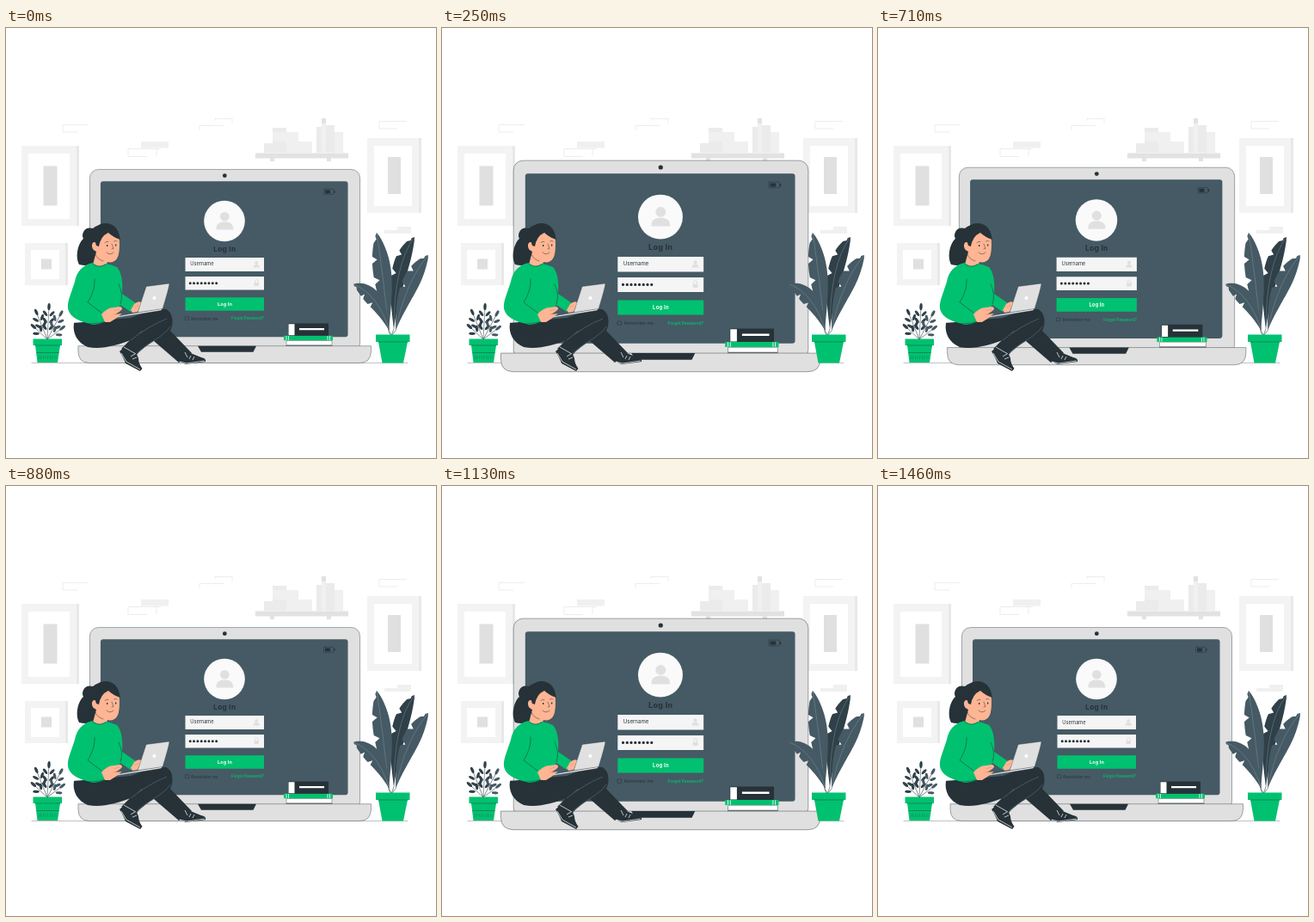
These frames come from a looping animation (500 by 500 pixels, 1500 ms). An HTML page:

```html
<!DOCTYPE html>
<html lang="en">
<head>
<meta charset="utf-8">
<title>Log in</title>
<style>
  html, body { margin: 0; width: 100%; height: 100%; overflow: hidden; background: #fff; }
  svg { display: block; width: 100%; height: 100%; font-family: Inter, sans-serif; }
  .ink { fill: #263238; }
  .slate { fill: #455a64; }
  .dusk { fill: #2f4049; }
  .green { fill: #00c170; }
  .skin { fill: #ffb594; }
  .pale { fill: #f5f5f5; }
  .grey { fill: #e0e0e0; }
  .white { fill: #fff; }
  .line { fill: none; stroke: #263238; stroke-width: .5; stroke-linecap: round; stroke-linejoin: round; }
  .edge { stroke: #263238; stroke-width: .4; stroke-linejoin: round; }
  .light { fill: none; stroke: #e6e6e6; stroke-width: .7; }
  .bold { font-weight: 700; letter-spacing: .04em; }
</style>
</head>
<body>
<svg viewBox="0 0 500 500">
  <!-- wall -->
  <path class="light" d="M96 112.500H66V121h17M164 149.500H142v-9h38M175 140v9M225 119v-5.500h28M243 108v-2.500h20v5M466 108.500H434V117h21"/>
  <path fill="#f0f0f0" d="M157 132h32v7.500h-32zM455 231h16v8h-16zM440 235h17v4h-17z"/>
  <g id="frames"></g>

  <!-- shelf -->
  <path fill="#ebebeb" d="M310 116h16v5h14v14h-30zM300 134h28v11h-28zM361 115h6v30h-6zM372 113h10v32h-10z"/>
  <path fill="#f0f0f0" d="M310 121h30v11h-30zM326 132h30v13h-30zM367 110h5v35h-5zM382 121h10v24h-10z"/>
  <path fill="#e2e2e2" d="M290 145.500h108v6H290zM307 151h5v4h-5zM373 151h5v4h-5zM367 105h5v6h-5z"/>

  <path class="line" style="stroke-width:.3" d="M30 389.500H467"/>

  <!-- computer -->
  <g id="device">
    <rect class="grey edge" x="97.500" y="164.500" width="314" height="212" rx="10"/>
    <rect class="slate" x="110" y="178.300" width="287.500" height="181" rx="3"/>
    <circle class="ink" cx="254.300" cy="171.700" r="2.400"/>
    <path class="grey edge" d="M84 369.700H424.500V376Q424 389.500 411 389.500H97Q84 389 84 376Z"/>
    <path class="ink" d="M223 369.700h68l-3.500 7h-60.500z"/>

    <rect class="line" x="369.500" y="187.300" width="11.500" height="6.200" rx="1"/>
    <path class="ink" d="M371 188.600h6v3.800h-6zM381.500 189h1v3h-1z"/>

    <circle fill="#fafafa" cx="254" cy="224.500" r="23.800"/>
    <circle class="grey" cx="254.300" cy="219.300" r="5.400"/>
    <path class="grey" d="M244.500 234.500C244 227 249 225.500 254.300 225.500S264.500 227 264.200 234.500Z"/>
    <text class="ink bold" x="254.300" y="259.600" font-size="8.200" text-anchor="middle">Log In</text>

    <path class="pale" d="M208.500 267H300v16H208.500zM208.500 289H300v15.500H208.500z"/>
    <text class="ink" x="214.300" y="276.500" font-size="5.600">Username</text>
    <path class="grey" d="M287.500 278.500q0-3.500 3.700-3.500t3.700 3.500zM288.500 296h5.500v4h-5.500z"/>
    <circle class="grey" cx="291.200" cy="273" r="2"/>
    <path fill="none" stroke="#e0e0e0" d="M289.500 296v-1.500a1.800 1.800 0 0 1 3.600 0v1.500"/>
    <path fill="none" stroke="#263238" stroke-width="3" stroke-linecap="round" stroke-dasharray="0 4.350" d="M214.200 296.700h31"/>

    <path class="green" d="M208.500 313.300H300v15.500H208.500z"/>
    <text class="white bold" x="254.500" y="323.100" font-size="5.400" text-anchor="middle">Log In</text>
    <rect class="line" x="208.700" y="335.800" width="3.800" height="3.800"/>
    <text class="ink" x="215.300" y="339.500" font-size="4.600">Remember me</text>
    <text class="green" x="300" y="339.400" font-size="4.400" font-weight="600" text-anchor="end">Forgot Password?</text>

    <path class="white edge" d="M326 363.500h53v5.300h-53z"/>
    <path class="line" d="M326 369.300h53"/>
    <path class="green" d="M323 357.800h57v5.500h-57z"/>
    <path stroke="#fff" stroke-width=".8" d="M326 358v5M328.500 358v5M374 358v5M376.500 358v5"/>
    <path class="ink" d="M328 343.500h47v14.300h-47z"/>
    <path class="white" d="M328.500 344.300h7v13h-7zM341 349h29v2.300h-29z"/>
  </g>

  <!-- tall plant -->
  <g id="tallPlant"></g>
  <path class="green" d="M430 356.500h39.500v8.500h-2.500L462 389.500H437.500L433 365h-3z"/>
  <path class="line" style="stroke-width:.4" d="M433 365h34"/>

  <!-- small plant -->
  <g id="smallPlant" transform="translate(48 362)"></g>
  <path class="green" d="M31.500 361.500H65V369h-2L60 389H36.500L34 369h-2.500z"/>
  <path class="line" style="stroke-width:.4" d="M34 369h29M36 377.500h25"/>
  <path fill="none" stroke="#263238" stroke-width="4" stroke-dasharray=".4 2.200" opacity=".6" d="M38 383h21"/>

  <!-- woman -->
  <path class="ink" d="M132 242C130 229 118 224 108 229Q103 231 101 233C91 230 87 240 90 245C84 250 80 265 85 275C93 277 100 276 105 271L124 262Z"/>
  <path class="skin" d="M105 250Q101 247 100 252T105 260L101 275Q108 281 116 277L118 272C125 274 130 269 131 263Q133 252 131 241Q123 240 118 237Q111 240 108 250Z"/>
  <path class="ink" d="M105 253C102 244 106 235 119 234Q130 232 133 246Q124 243 119 238Q110 242 108 254Z"/>
  <path class="line" d="M115 249.500q2-2 4-1M125.500 248q2-1.500 3.500 0M123 251l2 5.500-2 .5M117 261q4 4 8 0M104 263q2 6 9 8"/>
  <path class="ink" d="M117 252h1.300v2H117zM127 251.500h1.300v2H127z"/>

  <path class="ink" d="M79 343C77 355 83 366 95 371C112 374 128 369 145 363L158 352 201 389 216 378 191 352C195 345 195 331 186 327C172 325 157 333 145 337Z"/>
  <path class="ink" d="M148 359L134 373 152 380C163 367 184 359 191 348L180 341Z"/>
  <path fill="none" stroke="#78909c" stroke-width=".4" d="M191 347C184 359 164 366 151 379M145 363Q165 347 187 338"/>

  <path class="green" d="M101 273C90 275 82 283 80 295C76 308 71 318 72 326C74 337 87 342 102 345Q110 344 117 341L111 332 126 332 133 322 145 330 151 320 135 309C136 297 135 285 129 278Q122 275 116 274Q108 280 101 273Z"/>
  <path class="line" d="M103 292Q104 305 95 319L111 331M80 343Q100 346 117 341M133 321Q137 310 131 298M101 274Q107 280 116 275"/>

  <path class="grey edge" d="M163 300.500L190 297Q190 301 182 327L153 331Z"/>
  <path class="pale edge" d="M127 335.500L153 331 182 326.500 180 328.500 127 337Z"/>
  <circle class="white" cx="172.500" cy="314" r="2"/>
  <path class="skin" d="M111 333Q118 325 125 325L133 324Q137 326 133 329L127 333 135 332Q128 338 121 342L115 342ZM145 328L149 321Q154 317 157 319L153 330 147 331Z"/>
  <path fill="none" stroke="#d98268" stroke-width=".4" d="M125 329l7-2M125 333l8-1M149 325l5-3"/>

  <path class="ink" d="M139 370L132 376Q137 384 139 390L156 399 158.500 396Q154 390 154 384L151 377ZM210 376Q202 381 200 387L209 391 232 388Q233 384 227 383L217 379Z"/>
  <path fill="none" stroke="#fff" stroke-width=".7" d="M137 371l14 8M145 382l5-3M147 385l5-2M134 378l6 10 16 9M208 377l3 6M213 385l2-4M217 386l2-4M202 388l8 2 21-3"/>
</svg>
<script>
  const $ = id => document.getElementById(id);

  const rect = (x, y, w, h, fill) => `<rect x="${x}" y="${y}" width="${w}" height="${h}" fill="${fill}"/>`;

  // outer box, border width and the size of the centred block
  const pictureFrame = (x, y, w, h, border, blockW, blockH) => {
    const face = w - 3;
    return rect(x, y, w, h, '#e8e8e8') + rect(x, y, face, h, '#f3f3f3') +
      rect(x + border, y + border + 1, face - 2 * border, h - 2 * border - 1, '#fff') +
      rect(x + (w - blockW) / 2, y + (h - blockH) / 2, blockW, blockH, '#e0e0e0');
  };
  $('frames').innerHTML = pictureFrame(18, 137, 67, 93, 8, 16, 46) +
    pictureFrame(420, 128, 63, 87, 8, 15, 43) + pictureFrame(22, 250, 50, 49, 7, 12, 12);

  // notched blade around a quadratic midrib from base to tip
  function bigLeaf([bx, by], [cx, cy], [tx, ty], width, tone) {
    const steps = 28, left = [], right = [];
    for (let i = 0; i <= steps; i++) {
      const s = i / steps, r = 1 - s;
      const x = r * r * bx + 2 * r * s * cx + s * s * tx;
      const y = r * r * by + 2 * r * s * cy + s * s * ty;
      const dx = r * (cx - bx) + s * (tx - cx), dy = r * (cy - by) + s * (ty - cy);
      const half = width * Math.max(0, Math.sin(Math.PI * s ** 1.3)) ** .8 / Math.hypot(dx, dy);
      const notch = i > 10 && i % 6 === 2 ? .4 : 1;
      left.push([x + dy * half * notch, y - dx * half * notch]);
      right.unshift([x - dy * half, y + dx * half]);
    }
    const rib = `M448 358L${bx} ${by}Q${cx} ${cy} ${tx} ${ty}`;
    return `<path class="line" d="M448 358L${bx} ${by}"/><path class="${tone}" d="M${left.concat(right).join('L')}Z"/>` +
      `<path fill="none" stroke="#90a0a8" stroke-width=".4" d="${rib}"/>`;
  }
  $('tallPlant').innerHTML =
    bigLeaf([451, 350], [451, 275], [475, 243], 9, 'dusk') +
    bigLeaf([445, 353], [439, 290], [431, 238], 10.5, 'slate') +
    bigLeaf([453, 352], [464, 296], [491, 264], 10, 'slate') +
    bigLeaf([446, 353], [433, 309], [404, 298], 9, 'slate');

  // five stems fan out, each with leaves in pairs below its tip
  for (let k = -2; k <= 2; k++) {
    const length = 38 - 4 * k * k;
    let leaves = `<ellipse cy="${-length}" rx="1.700" ry="4"/>`;
    for (let d = length - 8; d > 11; d -= 8)
      for (const side of [-1, 1])
        leaves += `<ellipse rx="1.600" ry="3.800" transform="translate(${side * 4} ${-d}) rotate(${side * 40})"/>`;
    $('smallPlant').innerHTML += `<g class="${k > 0 ? 'slate' : 'dusk'}" transform="rotate(${k * 25 + 3})">
      <path class="line" d="M0 0V${-length}"/>${leaves}</g>`;
  }

  // two linear beats per loop: a slow one, a short rest, a quick one
  const beat = (t, rise, fall) => Math.max(0, Math.min(t / rise, 1 - (t - rise) / fall));
  const swell = t => t < 880 ? beat(t, 275, 545) : beat(t - 880, 275, 305);

  const start = performance.now();
  function draw() {
    const scale = 1 + .1 * swell((performance.now() - start) % 1500);
    $('device').setAttribute('transform', `translate(254.500 278) scale(${scale}) translate(-254.500 -278)`);
    requestAnimationFrame(draw);
  }
  draw();
</script>
</body>
</html>
```
